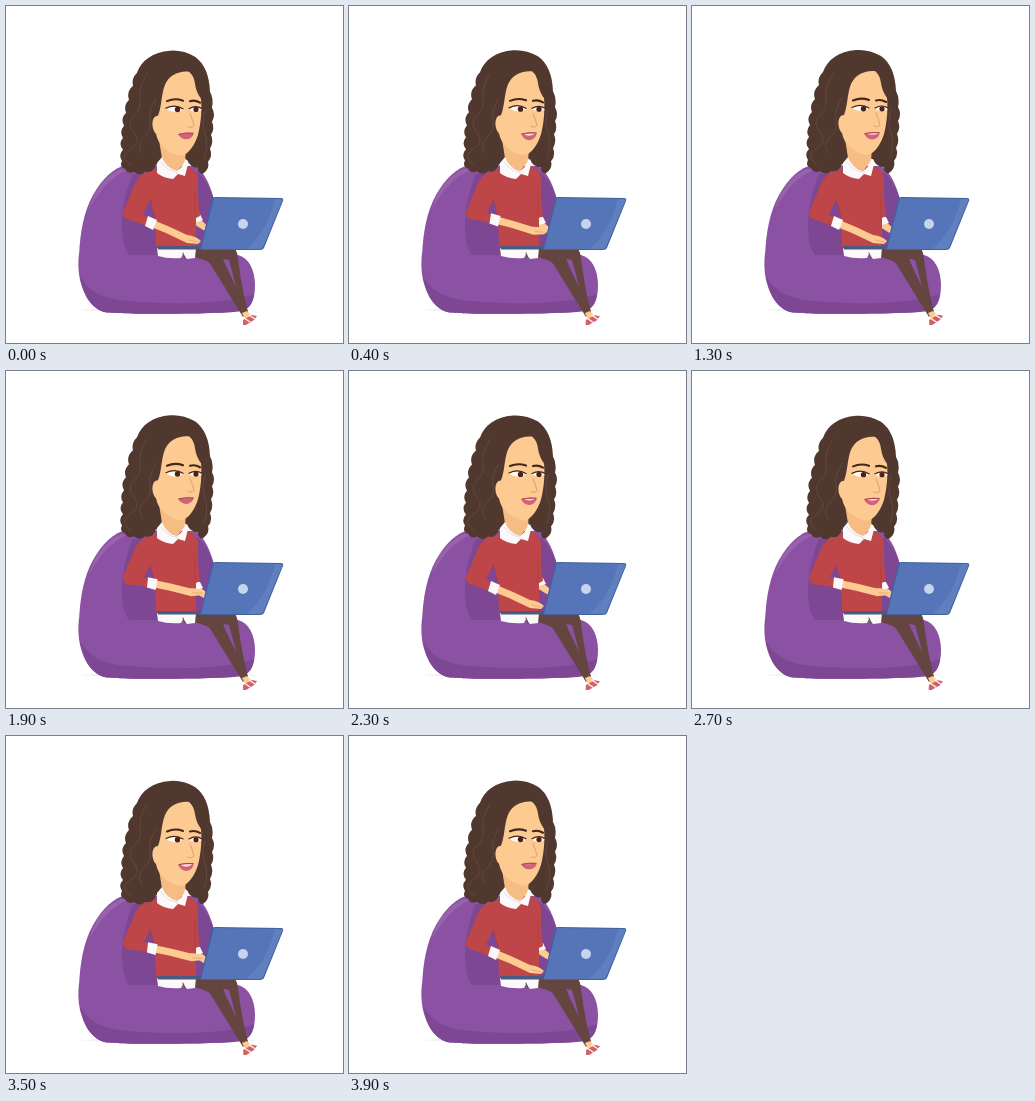
These frames come from a looping animation (337x337 px, 4000 ms). An HTML page:

```html
<!DOCTYPE html>
<html lang="en">
<head>
<meta charset="utf-8">
<title>Working from a beanbag</title>
<style>
  html, body { margin: 0; width: 100%; height: 100%; overflow: hidden; background: #fff; }
  svg { display: block; width: 100vw; height: 100vh; }
  .skin { fill: #fdca91; }
  .red { fill: #be4648; }
  .hair { fill: #50382f; }
  .white { fill: #fbf9fa; }
  .bag { fill: #8b51a2; }
  .bagShade { fill: #7d4793; }
  .line { fill: none; stroke-linecap: round; stroke-linejoin: round; }
</style>
</head>
<body>
<svg viewBox="0 0 337 337">
  <ellipse cx="163" cy="304" rx="88" ry="1.6" fill="#f1eff1"/>

  <g id="beanbag">
    <path class="bag" d="M73 250C74 226 78 205 87 189C96 173 108 161 121 159L190 160C199 167 205 181 208 194L210 256L74 262Z"/>
    <path fill="#9863ac" d="M83 203C88 185 98 170 115 163L121 164C105 171 94 184 83 203Z"/>
    <path class="bagShade" d="M127 168C119 186 116 205 116 222C117 238 119 245 125 251L205 251L208 194C204 181 199 173 192 167Z"/>
    <path class="bag" d="M73 247C84 254 103 251 124 249L232 249C243 252 249 264 249 279C249 294 245 302 235 305C220 308 115 309 98 306C83 301 77 286 74 274C72 265 72 256 73 247Z"/>
    <path class="bagShade" d="M74 270C83 287 99 293 122 295C165 299 221 298 248 288C247 298 243 303 235 305C220 308 115 309 98 306C83 301 77 286 74 270Z"/>
  </g>

  <g id="legs" fill="#64453f">
    <path d="M205 243H229C232 247 232 253 233 260C235 275 238 291 242 306L237 308C232 290 228 271 223 254L208 251Z"/>
    <path d="M189 243L210 244C216 247 217 253 220 260L242 306L237 311L205 259C202 254 196 254 189 251Z"/>
  </g>
  <g id="foot">
    <path class="skin" d="M236 307L241 305L246 310L240 315Z"/>
    <path fill="#d2616a" d="M237 314L246 309L251 310L248 314L240 319L237 319Z"/>
    <path class="line" stroke="#fff2ee" stroke-width="1.3" d="M238 312L244 316M243 309L249 313"/>
  </g>

  <path class="white" d="M151 242H190L189 252L181 253L177 248L175 252Q162 253 152 250Z"/>
  <path class="line" stroke="#64453f" d="M177 247L179 252"/>

  <g id="farHand">
    <path class="skin" d="M188 213L194 216L201 222L202 229L196 226L188 221Z"/>
    <path class="white" d="M187 210L194 211L197 217L190 219L186 215Z"/>
  </g>
  <path class="red" d="M137 168Q149 163 157 161L181 160Q190 163 192 171L192 193L194 210L190 212L190 241H150L149 211L144 192L130 181Z"/>
  <path class="line" stroke="#ad3d41" stroke-width=".8" d="M189 184V211M144 193L149 211"/>

  <g id="head">
    <path class="hair" d="M164 44C147 45 135 54 131 66q-6 6 -4 13q-7 6 -4 14q-6 6 -3 13q-6 6 -2 13q-5 6 -1 12q-5 6 0 12q-5 5 -1 11q-3 6 3 8q3 6 9 3q6 5 11 0q8 2 11 -7L181 153q3 8 11 8q0 7 5 6q7 -5 5 -12q5 -6 2 -13q4 -7 1 -14q4 -6 1 -13q4 -7 0 -14q2 -9 -2 -16Q203 60 189 50Q177 43 164 44Z"/>
    <path class="line" stroke="#614a40" stroke-width=".9" d="M141 67q-9 15 -7 25t-6 17t0 17t-4 17t1 16M150 92q-8 12 -6 22t-6 17t-2 16M199 104q-4 12 0 23t-1 25"/>
    <path fill="#f5bd84" d="M153 133L180 141L179 155L171 165L157 158Z"/>
    <path class="skin" d="M183 65C172 64 163 69 159 78C155 88 156 99 152 109C145 109 145 122 150 127C152 138 161 146 174 149C182 149 189 138 192 128C195 116 196 103 195 92Q190 85 189 77Q188 69 183 65Z"/>
    <path class="line" stroke="#42271f" stroke-width="2.1" d="M161 94.5Q169 91 177 94M184 94.5Q189 93 194 96"/>
    <path fill="#fffaf2" d="M160 102Q169 97 177 103Q168 108 160 102ZM183 103Q190 98 196 103Q190 107 183 103Z"/>
    <g fill="#4a211c"><circle cx="171.5" cy="102.8" r="2.7"/><circle cx="190" cy="102.8" r="2.6"/></g>
    <path class="line" stroke="#42271f" stroke-width="1.2" d="M160 101.5Q169 97 177 102M183 102Q190 98 196 102"/>
    <path class="line" stroke="#dda169" d="M184 107Q187 114 188 119Q186 122 182 120"/>
    <path id="lips" fill="#cf6377"/>
    <path id="teeth" fill="#f7dcd8"/>
    <path class="line" stroke="#9b4350" stroke-width=".9" d="M173 127.5Q180 126 187 126.5"/>
  </g>

  <path class="white" d="M151 157L156 151Q159 161 171 165Q179 160 179 152L182 158L179 170L172 168L167 173Q157 172 151 167Z"/>
  <path class="line" stroke="#d9d5db" stroke-width=".7" d="M155 156Q161 165 171 166V168"/>

  <path class="red" d="M140 166Q130 171 126 185L117 206Q116 212 124 214L135 212L145 192Z"/>
  <g id="forearm">
    <path class="skin" d="M145 213L164 221L181 229Q190 230 195 235L192 238L181 237L160 227L145 221Z"/>
    <path class="line" stroke="#dfa469" stroke-width=".7" d="M183 234L192 236"/>
    <path class="red" d="M119 203Q128 205 143 211L141 220L121 213Q115 209 119 203Z"/>
    <path class="white" d="M142 210L151 214L147 224L139 220Z"/>
  </g>

  <g id="laptop">
    <path fill="#4a5a80" d="M151 240H196V243.5H152Z"/>
    <path fill="#42619f" d="M206 192Q207 191 210 191L275 192Q278 192 277 195L258 242Q257 244 254 244H194Z"/>
    <path fill="#5575b8" d="M208 192L275 193Q277 193 276 195L257 241Q256 243 253 243H195Z"/>
    <path fill="#5f7fbf" d="M269 193L275 193Q277 193 276 195L257 241Q256 243 253 243H240Q261 226 269 193Z"/>
    <circle cx="237" cy="218" r="5" fill="#c6d4ec"/>
  </g>
</svg>
<script>
const LOOP = 4000, STEP = 100, BEAT = 800;
const el = id => document.getElementById(id);
const pose = (id, value) => el(id).setAttribute("transform", value);
const wave = (t, period, shift = 0) => Math.sin(2 * Math.PI * (t - shift) / period);

function draw(now) {
  const t = Math.floor((now % LOOP) / STEP) * STEP;

  // The hands take turns: one lifts in each half of the beat.
  const typing = wave(t, BEAT, BEAT / 8);
  pose("forearm", `rotate(${-11 * Math.max(0, typing)} 122 208)`);
  pose("farHand", `translate(0 ${-4 * Math.max(0, -typing)})`);

  pose("head", `translate(0 ${.5 - .5 * wave(t, LOOP, 200)})`);
  pose("foot", `rotate(${1.5 * wave(t, LOOP / 2)} 239 306)`);

  // Lips part and close once a second.
  const open = wave(t, 1000, 250) / 2 + .5;
  const low = 132.5 + 1.5 * open, bite = 127.2 + 2.5 * open;
  el("lips").setAttribute("d", `M172 127.5Q180 125 188 126.5Q186 ${low} 180 ${low}Q175 ${low} 172 127.5Z`);
  el("teeth").setAttribute("d", `M174.5 127.5L186.5 127Q184 ${bite} 180 ${bite}Q177 ${bite} 174.5 127.5Z`);
}

const start = performance.now();
function tick() {
  draw(performance.now() - start);
  requestAnimationFrame(tick);
}
tick();
</script>
</body>
</html>
```
